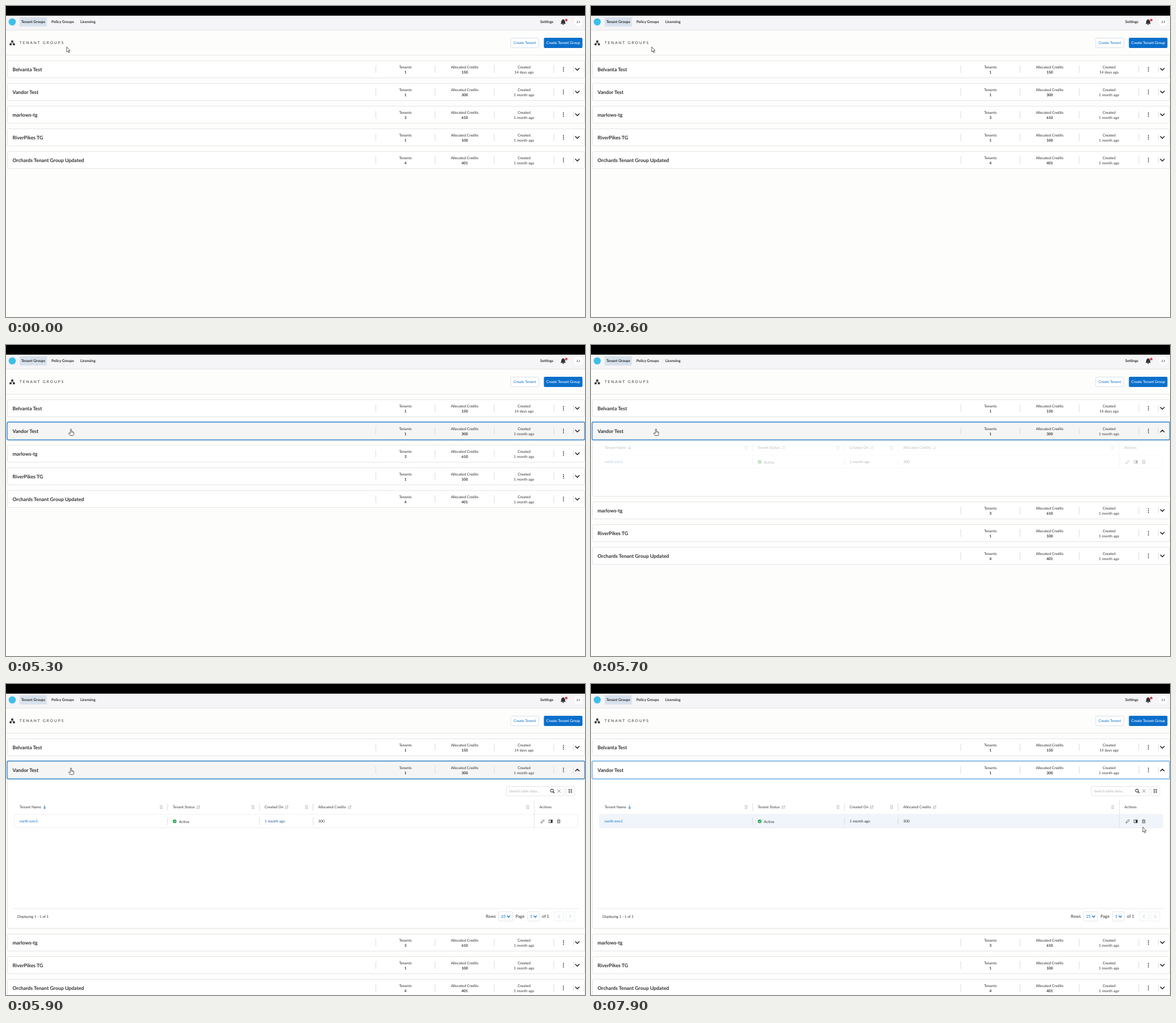
These frames come from a looping animation (1021 by 548 pixels, 8 s). An HTML page:

```html
<!DOCTYPE html>
<html lang="en">
<head>
<meta charset="utf-8">
<title>Tenant groups</title>
<style>
  html, body { margin: 0; width: 100%; height: 100%; overflow: hidden; background: #fdfdfc; }
  svg { display: block; width: 1021px; height: 548px; }
  text { font: 400 6.5px Lato, "Open Sans", sans-serif; fill: #303030; text-rendering: geometricPrecision; white-space: pre; }
  .bold { font-weight: 700; }
  .mid { text-anchor: middle; }
  .name { font-size: 8.75px; font-weight: 700; }
  .soft { font-weight: 500; fill: #4a4a4a; }
  .title { letter-spacing: 1.98px; }
  .blue { fill: #0b6fcb; }
  .pale { fill: #b3b3b3; }
  .big { font-size: 7.5px; }
  .count { font-size: 6.25px; }
  .tip { font-size: 11px; font-weight: 600; fill: #24132e; }
  .box { fill: #fff; stroke: #e5e5e5; }
  .rule { stroke: #dadada; fill: none; }
  .icon { stroke: #444; fill: none; }
  .fill { fill: #333; }
</style>
</head>
<body>
<svg id="stage" viewBox="0 0 1021 548"></svg>
<script>
const LOOP = 8000;
const ROW_TOP = 96, ROW_STEP = 40, ROW_HEIGHT = 31;
const TABLE_HEIGHT = 228, TOOLBAR_HEIGHT = 36;

const groups = [
  ["Belvanta Test", 1, 150, "14 days ago"],
  ["Vandor Test", 1, 300, "1 month ago"],
  ["marlows-tg", 3, 610, "1 month ago"],
  ["RiverPikes TG", 1, 100, "1 month ago"],
  ["Orchards Tenant Group Updated", 4, 401, "1 month ago"]
];

const text = (x, y, s, cls = "", extra = "") => `<text x="${x}" y="${y}" class="${cls}" ${extra}>${s}</text>`;
const rect = (x, y, w, h, attrs = "") => `<rect x="${x}" y="${y}" width="${w}" height="${h}" ${attrs}/>`;
const circle = (x, y, r, fill) => `<circle cx="${x}" cy="${y}" r="${r}" fill="${fill}"/>`;
const path = (d, attrs) => `<path d="${d}" ${attrs}/>`;
const vline = (x, y1, y2) => path(`M${x} ${y1}V${y2}`, 'class="rule"');
const at = (x, y, body, attrs = "") => `<g transform="translate(${x} ${y})" ${attrs}>${body}</g>`;
const chevron = (w, h, color, width) =>
  path(`M${-w} ${-h}L0 ${h}L${w} ${-h}`, `fill="none" stroke="${color}" stroke-width="${width}" stroke-linecap="round" stroke-linejoin="round"`);

function navBar() {
  const bell = path("M-4.6 3.2C-3.4 2.1-3.6 .2-3.3-1.4C-3-3.2-1.9-4.1-.6-4.4V-5.1H.6V-4.4C1.9-4.1 3-3.2 3.3-1.4C3.6 .2 3.4 2.1 4.6 3.2ZM-1.3 3.8H1.3A1.3 1.3 0 0 1-1.3 3.8Z", 'class="fill"');
  return rect(0, 0, 1021, 43, 'fill="#f5f4f6"') + rect(0, 0, 1021, 17, 'fill="#000"') +
    path("M0 42.5H1021", 'stroke="#e2e2e4"') +
    circle(11, 28, 6.3, "#3dbfe9") +
    rect(24, 20, 48, 16, 'rx="1" fill="#d8e2ed"') +
    text(27, 30.3, "Tenant Groups", "bold") +
    text(80, 30.3, "Policy Groups", "bold") +
    text(131, 30.3, "Licensing", "bold") +
    text(942, 30.3, "Settings", "bold") +
    at(982.5, 28.3, bell) + circle(988, 24.7, 2.2, "#e23b50") +
    circle(1009, 28, 7.5, "#fff") + text(1009, 30, "J J", "bold mid", 'style="font-size:5.6px"');
}

function pageHeader() {
  const tree = rect(9.2, 60.8, 3.6, 3.2, 'class="fill"') +
    [6.3, 12.1].map(x => rect(x, 66, 3.6, 3.2, 'class="fill"')).join("") +
    path("M11 64V65.2M8.1 66V65.1H13.9V66", 'class="icon" stroke-width=".8"');
  return tree + text(24, 67.4, "TENANT GROUPS", "title") +
    rect(890, 56.5, 49.5, 17, 'rx="2" fill="#fff" stroke="#d9e1e9"') +
    text(914.7, 67.3, "Create Tenant", "mid blue") +
    rect(948.5, 56, 68, 18, 'rx="2" fill="#0b6fcb"') +
    text(982.5, 67.3, "Create Tenant Group", "mid", 'style="fill:#fff;font-weight:500"') +
    path("M0 86.5H1021", 'stroke="#e6e6e6"');
}

function groupRow([name, tenants, credits, created], i) {
  const stat = (x, label, value, cls) => text(x, 14.4, label, "mid") + text(x, 23.1, value, "mid " + cls);
  return at(0, ROW_TOP + ROW_STEP * i,
    rect(2.5, .5, 1018, 30, `rx="2" class="box" id="bg${i}"`) +
    text(11.5, 18.7, name, "name") +
    [652, 756.5, 861, 966].map(x => vline(x, 9, 22)).join("") + vline(1000.5, 10, 21) +
    stat(704.3, "Tenants", tenants, "bold") +
    stat(808.8, "Allocated Credits", credits, "bold") +
    stat(913.5, "Created", created, "soft") +
    [12.4, 15.5, 18.6].map(y => circle(983, y, .9, "#222")).join("") +
    at(1007.5, 15.6, `<g id="chev${i}">${chevron(3.3, 1.7, "#222", 1.5)}</g>`),
    `id="row${i}"`);
}

function tableBody() {
  const grip = x => [-1.3, 1.3].map(dx => [-2.6, 0, 2.6].map(dy => circle(x + dx, 181 + dy, .75, "#8d8d8d")).join("")).join("");
  const sort = x => at(x, 181, path("M-1.5-3V2.8M-3 1.2L-1.5 2.8L0 1.2M1.7 3V-2.8M.2-1.2L1.7-2.8L3.2-1.2", 'fill="none" stroke="#999" stroke-width=".75"'));
  const select = (x, w, value) => rect(x, 365.3, w, 16.4, 'rx="2" class="box"') +
    text(x + 4.5, 376, value, "blue", 'style="font-size:7px"') + at(x + w - 7.3, 373.8, chevron(2.3, 1.3, "#0b6fcb", 1.3));
  const pager = (x, turn) => rect(x - 8, 365.3, 16, 16.4, 'rx="2" fill="none" stroke="#f0f1f2"') +
    at(x, 373.6, `<g transform="rotate(${turn})">${chevron(2.6, 1.3, "#9fc4e6", 1)}</g>`);
  const pencil = path("M-3 3L-2.4 .8L1.5-3L3-1.5L-.9 2.4Z", 'class="icon" stroke-width=".8"');
  const split = rect(-3, -2.4, 6, 4.8, 'class="icon" stroke-width=".8"') + rect(0, -2.4, 3, 4.8, 'class="fill"');
  const trash = path("M-3-2H3M-1-2V-3H1V-2M-2.2-2V3H2.2V-2M-.8-.5V1.8M.8-.5V1.8", 'class="icon" stroke-width=".75"');
  return text(24, 183.3, "Tenant Name", "soft") +
    path("M68 177.8V183.6M65.8 181.5L68 183.7L70.2 181.5", 'fill="none" stroke="#0b6fcb"') +
    text(294, 183.3, "Tenant Status", "soft") + text(456, 183.3, "Created On", "soft") +
    text(550.5, 183.3, "Allocated Credits", "soft") + text(940.5, 183.3, "Actions", "soft") +
    [339, 495, 606].map(sort).join("") + [273.5, 435.5, 530, 920].map(grip).join("") +
    rect(15, 193.8, 993, 23.5, 'rx="1" fill="#fff" stroke="#eeeeee" id="tableRow"') +
    [285, 447, 541.5].map(x => vline(x, 174.5, 187.5) + vline(x, 199.5, 212.5)).join("") +
    path("M931.5 169V217.5", 'stroke="#e4e4e4"') +
    text(24, 208.2, "north-env1", "blue") +
    circle(297.4, 206, 3.3, "#2fa84f") + path("M295.8 206.1L297 207.3L299.1 204.9", 'fill="none" stroke="#fff" stroke-width=".9"') +
    text(305, 208.5, "Active") + text(456, 208.2, "1 month ago", "", 'id="cellDate"') + text(550.5, 208.2, "300") +
    at(946.3, 206, pencil) + at(960.5, 206, split) + at(974.6, 206, trash) +
    path("M11 359.7H1012", 'stroke="#e8e8e8"') +
    text(20, 375.9, "Displaying 1 - 1 of 1", "count") +
    text(846, 376.3, "Rows", "big") + select(868.5, 25, "25") +
    text(898.5, 376.3, "Page", "big") + select(919.5, 21, "1") +
    text(945, 376.3, "of 1", "big") + pager(975, 90) + pager(995, -90);
}

function toolbar() {
  return rect(882.5, 180.5, 101.5, 16.5, 'rx="2" class="box"') +
    text(887, 190.9, "Search table data...", "pale") +
    path("M964.8 190L967 192.2", 'stroke="#333" stroke-width="1.4"') +
    `<circle cx="962.8" cy="187.9" r="2.5" class="icon" stroke-width="1.1"/>` +
    path("M972.2 185.7L978 191.5M978 185.7L972.2 191.5", 'stroke="#777" stroke-width=".9"') +
    rect(987.5, 180.5, 15.5, 16.5, 'rx="2" class="box"') +
    [186, 188.6, 191.2].map(y => path(`M992 ${y}H994.4M995.6 ${y}H998.2`, 'stroke="#333" stroke-width="1.3"')).join("");
}

const callout = path("M658 32H848Q853 32 853 37V53.2L880 58.2L846 58.8Q846 59 845 59H658Q653 59 653 54V37Q653 32 658 32Z", 'fill="#f0bafb"') +
  text(660, 49.7, "Create and manage tenants with ease", "tip");
const arrow = path("M0 0V9L2.1 7.2L3.5 10.3L4.9 9.7L3.6 6.7H6.2Z", 'fill="#fff" stroke="#333" stroke-width=".8" stroke-linejoin="round"');
const hand = at(.6, .5,
  path("M-1 0Q0-.9 1 0V4L3.5 4.5Q5 4.9 5 6.3V8Q5 9.5 4 11H-1.6L-4 7.4Q-4.3 6.2-3 6.2L-1 7.5Z", 'fill="#fff" stroke="#333" stroke-width=".8" stroke-linejoin="round"') +
  path("M1 4V6M2.4 4.4V6.2M3.7 4.7V6.4", 'stroke="#333" stroke-width=".5"'));

const stage = document.getElementById("stage");
stage.innerHTML = `<defs><clipPath id="reveal">${rect(0, 167, 1021, 0, 'id="revealRect"')}</clipPath></defs>` +
  rect(0, 0, 1021, 548, 'fill="#fdfdfc"') + navBar() + pageHeader() +
  `<g id="panel">${rect(2.5, 160, 1018, 0, 'rx="2" class="box" id="panelBox"')}
   <g clip-path="url(#reveal)"><g id="toolbar">${toolbar()}</g><g id="table">${tableBody()}</g></g></g>` +
  groups.map(groupRow).join("") +
  `<g id="ring" fill="none">${rect(2, 135.8, 1018.6, 31.4, 'rx="2.5" stroke="#d6e7f7" stroke-width="3"')}
   ${rect(2, 135.8, 1018.6, 31.4, 'rx="2.5" stroke-width="1.4" id="ringLine"')}</g>` +
  `<g id="callout">${callout}</g><g id="cursor"><g id="arrow">${arrow}</g><g id="hand">${hand}</g></g>`;

const el = id => document.getElementById(id);
const show = (id, on) => el(id).setAttribute("visibility", on ? "inherit" : "hidden");
const set = (id, attr, value) => el(id).setAttribute(attr, value);
const clamp01 = v => Math.max(0, Math.min(1, v));
const easeInOut = p => p * p * (3 - 2 * p);

// Pointer path: time, x, y
const track = [
  [0, 107, 72], [4000, 107, 72], [4030, 112, 95], [4130, 113, 124], [4250, 114, 141], [4400, 114, 148],
  [6630, 114, 148], [6760, 122, 205], [7000, 174, 354], [7150, 330, 396], [7300, 510, 368],
  [7460, 690, 309], [7500, 735, 304], [7650, 895, 264], [7780, 960, 250], [7900, 973, 252]
];

function pointerAt(t) {
  const next = track.findIndex(k => k[0] > t);
  if (next < 0) return track[track.length - 1].slice(1);
  const [a, b] = [track[next - 1], track[next]];
  const p = (t - a[0]) / (b[0] - a[0]);
  return [a[1] + (b[1] - a[1]) * p, a[2] + (b[2] - a[2]) * p];
}

function render(t) {
  const [x, y] = pointerAt(t);
  const hovered = [0, 1].find(i => y >= ROW_TOP + ROW_STEP * i && y <= ROW_TOP + ROW_STEP * i + ROW_HEIGHT);
  const overRow = hovered !== undefined;
  [0, 1].forEach(i => set("bg" + i, "style", `fill:${hovered === i ? "#f5f5f5" : "#fff"}`));

  show("callout", t >= 1500 && t < 2600);
  show("arrow", !overRow);
  show("hand", overRow);
  set("cursor", "transform", `translate(${x} ${y})`);

  show("ring", t >= 5300);
  set("ringLine", "stroke", overRow ? "#4a8fcb" : "#86baea");

  const open = t >= 5630;
  const shift = t >= 5860 ? TOOLBAR_HEIGHT : 0;
  const height = open ? TABLE_HEIGHT * easeInOut(clamp01((t - 5600) / 220)) + shift : 0;
  show("panel", open);
  show("toolbar", shift > 0);
  set("panelBox", "height", height + 6.5);
  set("revealRect", "height", height);
  set("table", "transform", `translate(0 ${shift})`);
  set("table", "opacity", clamp01((t - 5600) / 300));
  set("chev1", "transform", open ? "scale(1 -1)" : "");
  for (let i = 2; i < groups.length; i++) set("row" + i, "transform", `translate(0 ${ROW_TOP + ROW_STEP * i + height})`);

  const rowHover = t > 7500 && y < 253.5;
  set("tableRow", "fill", rowHover ? "#eff5fa" : "#fff");
  set("cellDate", "style", t >= 5860 && t < 7500 ? "fill:#1f5f9c" : "");
}

const start = performance.now();
function tick() {
  render((performance.now() - start) % LOOP);
  requestAnimationFrame(tick);
}
tick();
</script>
</body>
</html>
```
